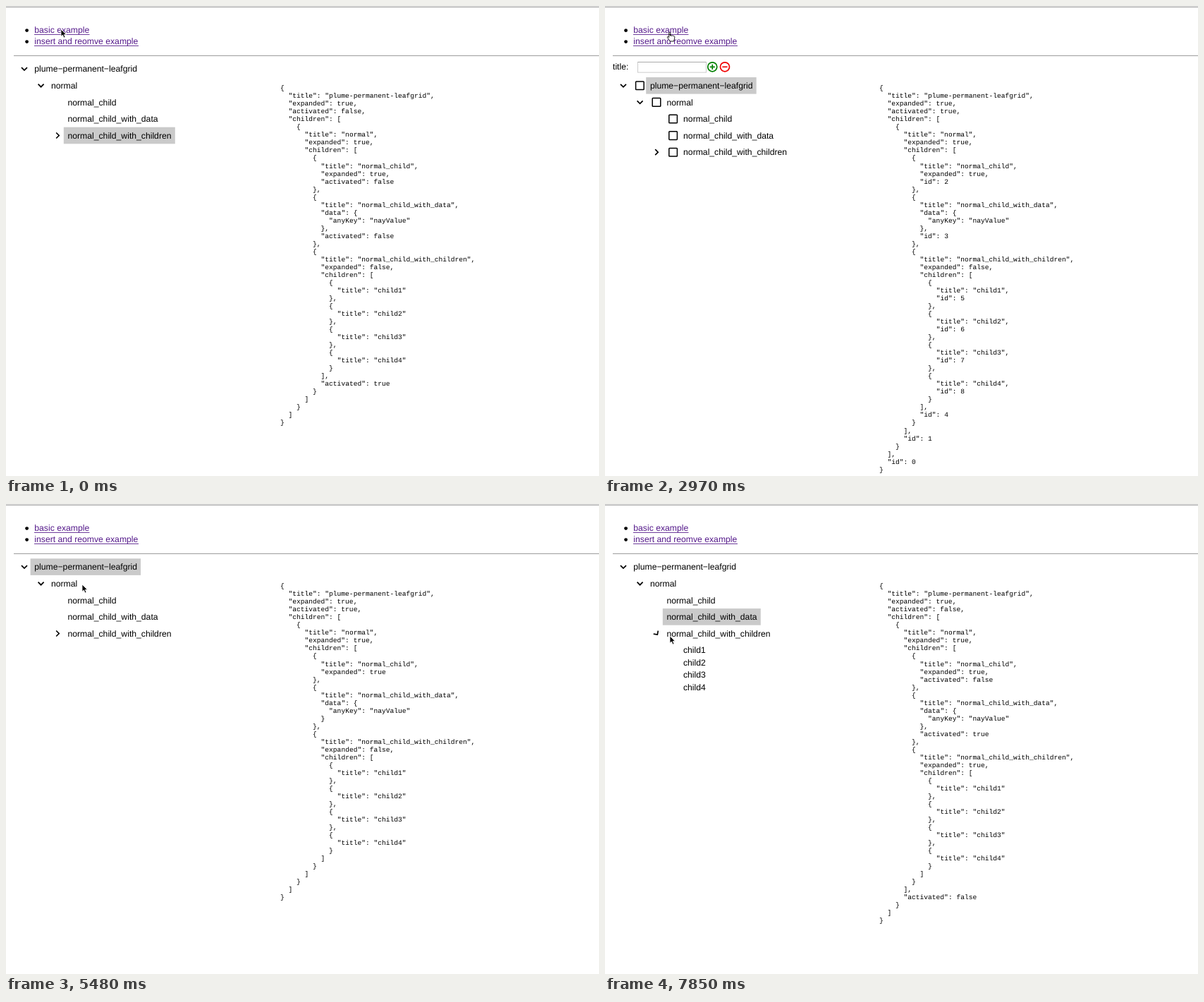
These frames come from a looping animation (841x666 px, 7.99 s). An HTML page:

```html
<!DOCTYPE html>
<html lang="en">
<head>
<meta charset="utf-8">
<title>Tree view demo</title>
<style>
  html, body { margin: 0; width: 100%; height: 100%; overflow: hidden; background: #fff; }
  svg { display: block; width: 841px; height: 666px; }
  text { font: 12.2px "Liberation Sans", Arial, sans-serif; text-rendering: geometricPrecision; white-space: pre; }
  .link { fill: #551a8b; }
  .json text { font: 9.6px "Liberation Mono", "Courier New", monospace; }
</style>
</head>
<body>
<svg viewBox="0 0 841 666">
  <defs><clipPath id="reveal"><rect id="window" width="380" height="0"/></clipPath></defs>
  <rect y="0.6" width="841" height="1.6" fill="#b0b0b0"/>
  <circle cx="29.6" cy="34.6" r="2.4"/>
  <circle cx="29.6" cy="50.6" r="2.4"/>
  <text class="link" x="40.3" y="38.3">basic example</text>
  <text class="link" x="40.3" y="54.3">insert and reomve example</text>
  <path d="M40 40.4H118.5M40 56.4H188" stroke="#551a8b" stroke-width="0.9"/>
  <path d="M11 70.4H841" stroke="#999" stroke-width="1"/>
  <g id="form" fill="none" stroke-width="1.7">
    <text x="11" y="90.3" fill="#000">title:</text>
    <rect x="46.5" y="79.5" width="97" height="14.6" stroke="#ccc" stroke-width="1"/>
    <path d="M46.5 79.5h97" stroke="#aaa" stroke-width="1"/>
    <g stroke="#008000"><circle cx="152.3" cy="86.3" r="6.5"/><path d="M148.7 86.3h7.2M152.3 82.7v7.2"/></g>
    <g stroke="#f00000"><circle cx="170" cy="86.3" r="6.5"/><path d="M166.4 86.3h7.2"/></g>
  </g>
  <g clip-path="url(#reveal)"><g id="tree"></g></g>
  <g id="json" class="json"></g>
  <g id="cursor">
    <path id="arrow" d="M0 0V10.2L2.4 8L4.1 12L6 11.2L4.3 7.4H7.4Z" stroke="#fff" stroke-width="0.8"/>
    <path id="hand" d="M2.2 1.2C2.2-.3 4.3-.3 4.3 1.2V5.2C5-.0 0 4.4 6.4 5.2C7 4.6 8.2 4.8 8.5 5.7C9.3 5.2 10.3 5.8 10.3 7C10.3 9.5 9.6 10.6 9 13H3.6C3 11.3 1.2 9.6 0 7.6C-.6 6.4 .9 5.9 2.2 7.5Z" fill="#fff" stroke="#000" stroke-width="0.9" stroke-linejoin="round"/>
  </g>
</svg>
<script>
const LOOP = 7990, TICK = 148.15, GROW = 450;
const ROW = 23.6, LINE = 11.03, CHAR = 5.76;
const ROOT = 'plume-permanent-leafgrid';
const $ = id => document.getElementById(id);

// Selected row by tick: 0 root, 1 normal, 2 child, 3 data, 4 children
const scenes = [
  { from: 0, active: 4, touched: [0, 2, 3, 4] },
  { from: 13, insert: true, active: 0, touched: [], start: 1890 },
  { from: 30, active: 0, touched: [0], start: 4333 },
  { from: 41, active: 1, touched: [0, 1] },
  { from: 44, active: 2, touched: [0, 1, 2] },
  { from: 48, active: 3, touched: [0, 1, 2, 3] },
  { from: 53, active: 3, touched: [0, 1, 2, 3], open: true }
];

// tick, x, y, hand
const path = [
  [0, 78, 33], [1, 24, 60], [2, 300, 300], [3, 564, 524], [8, 564, 524],
  [9, 420, 290], [10, 210, 90], [11, 112, 35], [12, 89, 49, 1], [16, 89, 49, 1],
  [17, 88.5, 42, 1], [18, 88.5, 37.5, 1], [19, 88.5, 37.5, 1], [20, 88.5, 37, 1],
  [22, 88.5, 37, 1], [23, 88, 35, 1], [25, 86, 33, 1], [29, 88, 36, 1], [30, 95, 83],
  [33, 98, 92], [37, 108, 114], [38, 106, 113], [39, 100, 112], [42, 92, 111],
  [43, 92, 111], [44, 120, 148], [47, 122, 158], [50, 118, 160], [51, 118, 160],
  [52, 84, 183], [53, 92, 187]
];

function model({ insert, active, touched, open }) {
  const tail = i => insert ? { id: i } : touched.includes(i) ? { activated: i === active } : {};
  const kids = [1, 2, 3, 4].map(n => ({ title: 'child' + n, ...(insert && { id: n + 4 }) }));
  const normal = {
    title: 'normal', expanded: true,
    children: [
      { title: 'normal_child', expanded: true, ...tail(2) },
      { title: 'normal_child_with_data', data: { anyKey: 'nayValue' }, ...tail(3) },
      { title: 'normal_child_with_children', expanded: !!open, children: kids, ...tail(4) }
    ],
    ...tail(1)
  };
  return { title: ROOT, expanded: true, activated: active === 0, children: [normal], ...(insert && { id: 0 }) };
}

function jsonMarkup(scene) {
  return JSON.stringify(model(scene), null, 2).split('\n').map((line, i) => {
    const text = line.trimStart();
    const x = 389 + (line.length - text.length) * CHAR;
    return `<text x="${x}" y="${119.2 + i * LINE}">${text}</text>`;
  }).join('');
}

const chevron = (x, y, turn) =>
  `<path d="M-2-4L2 0L-2 4" transform="translate(${x} ${y}) rotate(${turn})" fill="none" stroke="#000" stroke-width="1.7"/>`;

function treeMarkup({ insert, active, open }) {
  const top = insert ? 101 : 77.3;
  const rows = [
    [ROOT.replace(/-/g, '\u2212'), 0, 156.5, 90], ['normal', 1, 49, 90], ['normal_child', 2, 80],
    ['normal_child_with_data', 2, 139], ['normal_child_with_children', 2, 158, open ? 55 : 0]
  ];
  let out = rows.map(([label, depth, width, turn], i) => {
    const y = top + (i + 0.5) * ROW;
    const arrowX = 26 + depth * ROW;
    const x = arrowX + 14.3 + (insert ? ROW : 0);
    return (i === active ? `<rect x="${x - 5.7}" y="${y - ROW / 2}" width="${width}" height="${ROW}" fill="#cacaca"/>` : '')
      + (turn === undefined ? '' : chevron(arrowX, y, turn))
      + (insert ? `<rect x="${arrowX + 17.6}" y="${y - 5.8}" width="11.6" height="11.6" rx="0.8" fill="none" stroke="#000" stroke-width="1.5"/>` : '')
      + `<text x="${x}" y="${y + 4.2}">${label}</text>`;
  }).join('');
  if (open) for (let n = 1; n <= 4; n++) out += `<text x="111" y="${193.6 + n * 17.6}">child${n}</text>`;
  return out;
}

function moveCursor(tick) {
  const i = path.findLastIndex(p => p[0] <= tick);
  const a = path[i], b = path[i + 1] || a;
  const f = b === a ? 0 : (tick - a[0]) / (b[0] - a[0]);
  $('cursor').setAttribute('transform', `translate(${a[1] + (b[1] - a[1]) * f} ${a[2] + (b[2] - a[2]) * f})`);
  $('arrow').style.display = a[3] ? 'none' : '';
  $('hand').style.display = a[3] ? '' : 'none';
}

let shownScene, shownTick;

function draw(t) {
  const tick = Math.min(53, Math.floor((t + 3) / TICK));
  if (tick === shownTick) return;
  shownTick = tick;
  const scene = scenes.findLast(s => s.from <= tick);
  if (scene !== shownScene) {
    shownScene = scene;
    $('form').style.display = scene.insert ? '' : 'none';
    $('tree').innerHTML = treeMarkup(scene);
    $('json').innerHTML = jsonMarkup(scene);
  }
  const p = scene.start ? Math.max(0, Math.min(1, (tick * TICK - scene.start) / GROW)) : 1;
  const full = (scene.open ? 9 : 5) * ROW;
  $('window').setAttribute('y', scene.insert ? 100.4 : 77);
  $('window').setAttribute('height', full * p * p * (3 - 2 * p) + (p > 0 ? 1 : 0));
  moveCursor(tick);
}

const begin = performance.now();
function frame() {
  draw((performance.now() - begin) % LOOP);
  requestAnimationFrame(frame);
}
frame();
</script>
</body>
</html>
```
